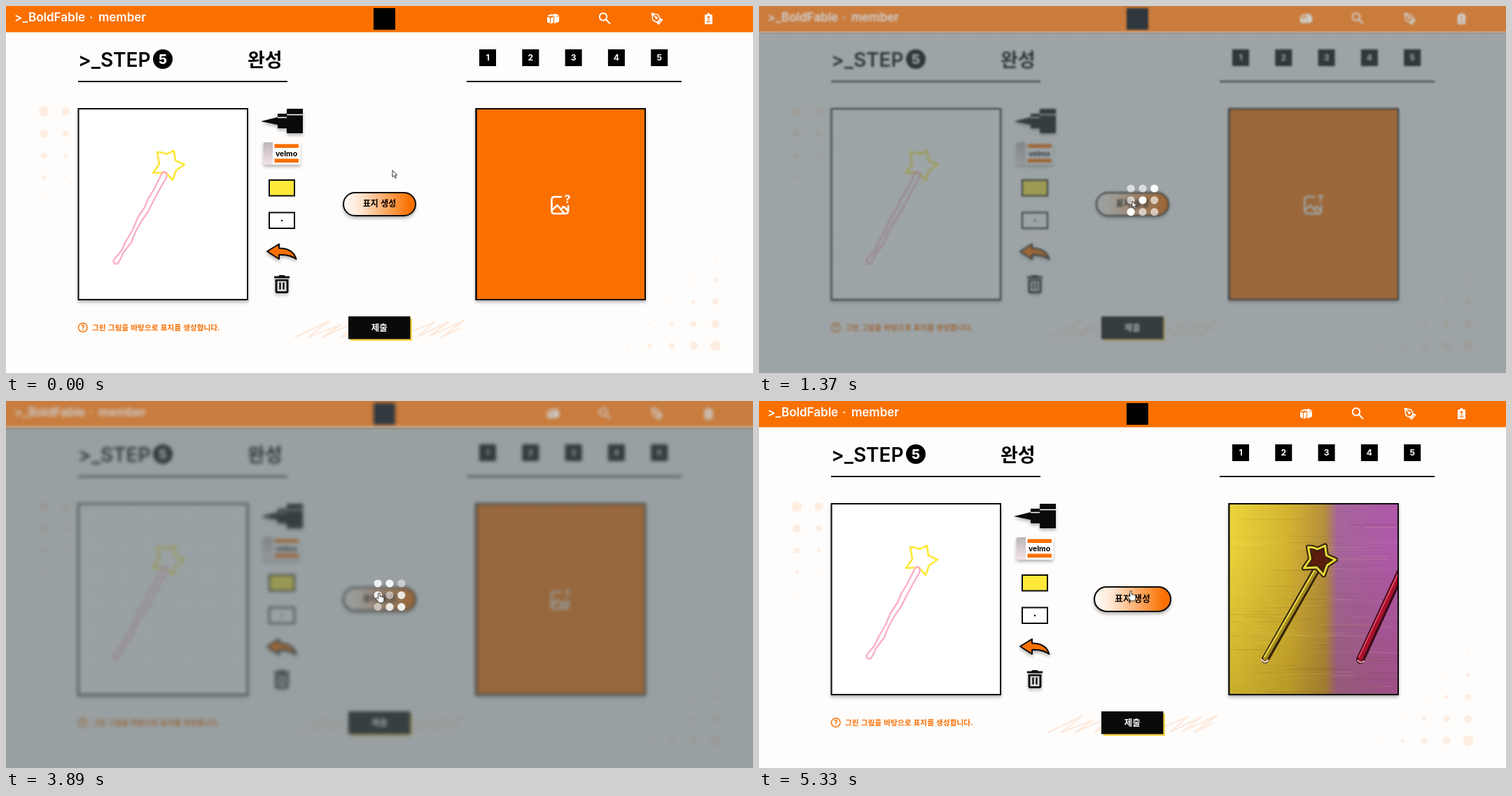
An HTML page that plays this animation: 1067x525 px, repeating every 5360 ms.

```html
<!DOCTYPE html>
<html lang="ko">
<head>
<meta charset="utf-8">
<style>
html, body { margin: 0; width: 100%; height: 100%; overflow: hidden; background: #fefdfc; }
svg, #veil { position: absolute; left: 0; top: 0; width: 1067px; height: 525px; }
svg { font-family: Inter, "Noto Sans CJK KR", "Noto Sans CJK", sans-serif; }
.ko { font-family: "Noto Sans CJK KR", "Noto Sans CJK", sans-serif; font-weight: 700; }
.mid { text-anchor: middle; }
.line { fill: none; stroke-linecap: round; stroke-linejoin: round; }
.box { stroke: #0a0a0a; stroke-width: 2; }
.sh { filter: drop-shadow(0 3px 2px rgba(0, 0, 0, .28)); }
#veil { background: linear-gradient(rgba(125, 143, 157, .4) 38px, rgba(85, 98, 102, .6) 38px); }
</style>
</head>
<body>
<svg viewBox="0 0 1067 525">
  <defs>
    <linearGradient id="btnFill"><stop offset=".04" stop-color="#fff8f2"/><stop offset=".25" stop-color="#ffe3cd"/><stop offset=".92" stop-color="#fa7000"/></linearGradient>
    <linearGradient id="rubber" x2="0" y2="1"><stop stop-color="#b9b5b6"/><stop offset="1" stop-color="#f5e4e8"/></linearGradient>
    <linearGradient id="sky"><stop stop-color="#ead43a"/><stop offset=".35" stop-color="#d3b431"/><stop offset=".57" stop-color="#b48e3c"/><stop offset=".64" stop-color="#a5659a"/><stop offset="1" stop-color="#b057aa"/></linearGradient>
    <linearGradient id="dusk" x2="0" y2="1"><stop offset=".2" stop-color="#5a3200" stop-opacity="0"/><stop offset="1" stop-color="#5a3200" stop-opacity=".22"/></linearGradient>
    <clipPath id="frame"><path d="M672 148h240v272h-240z"/></clipPath>
    <path id="star" d="M216 209Q224 209 229 212L240 207 242 221 255 227 243 235 238 249 228 238 210 239 219 226Z"/>
  </defs>

  <g id="dots" fill="#feeee2"></g>

  <!-- header -->
  <path d="M0 0h1067v37.5H0z" fill="#fa7000"/>
  <g fill="#fff" font-size="17" font-weight="600">
    <text x="12" y="22">&gt;_BoldFable</text><text x="119" y="22">·</text><text x="132" y="22">member</text>
  </g>
  <path d="M525 3h31v31h-31z"/>
  <g fill="#fff">
    <path d="M773 14l6-2.500 3 1-5 2.500zM779.500 13l5-2 5.500 2.500-6 2.500zM773 15.500l4 1.500v8l-4-2zM778 17l4-1.700v8.500l-4 1.700zM783 16.500l7-2v8l-7 2.500z"/>
    <path d="M999.500 12h2.500v-2h3v2h2.500q1.500 0 1.500 1.500v11q0 1.500-1.500 1.500h-8q-1.500 0-1.500-1.500v-11q0-1.500 1.500-1.500z"/>
  </g>
  <g class="line" stroke="#fff" stroke-width="2">
    <circle cx="853" cy="15.500" r="5.200"/><path d="M857 19.500l5.500 5.500"/>
    <path stroke-width="1.600" d="M922.500 10.500l9 2 3 6-4.500 5-6-3zM922.500 10.500l6.500 6.500M930.500 24.500l5.500-6 1.500 1.500-5.500 6z"/>
    <circle cx="929" cy="17" r="1"/>
  </g>
  <g fill="#fa7000"><circle cx="1003.500" cy="16" r="1.800"/><path d="M1000.500 20.500q3-3 6 0zM1000.500 22h6v1.200h-6z"/></g>

  <!-- titles -->
  <text x="103" y="87" font-size="28" font-weight="600">&gt;_STEP</text>
  <circle cx="224" cy="76" r="14"/>
  <text x="224" y="83" class="mid" font-size="19" font-weight="800" fill="#fff">5</text>
  <text x="345" y="86.500" class="ko" font-size="27">완성</text>
  <path d="M103 107h299v2H103zM658 107h307v2H658z" fill="#0a0a0a"/>
  <g id="steps" class="mid" font-size="12" font-weight="700"></g>

  <!-- drawing -->
  <rect class="box sh" x="103.500" y="147" width="241.500" height="273" fill="#fff"/>
  <use href="#star" class="line" stroke="#fee83a" stroke-width="2.700"/>
  <path class="line" stroke="#fbafca" stroke-width="2.400" d="M223 239L212 261 203 276 198 288 188 303 181 320 171 337 165 350 154 363Q152 369 159 369L163 363 167 354 179 338 185 323 194 307 203 294 211 278 219 263 229 246Q231 238 226 237Z"/>

  <!-- tools -->
  <g class="sh">
    <path d="M364 165l24-6v-5h13v-7h23v35h-23v-7h-13v-5z" fill="#0a0a0a"/>
    <path d="M388 159.500h13M401 155.500h23" stroke="#fff" stroke-width="1.600"/>
  </g>
  <g class="sh">
    <rect x="367.500" y="195" width="53" height="32" rx="3" fill="#fff"/>
    <path d="M381 195v32h-10.500q-3 0-3-3v-26q0-3 3-3z" fill="url(#rubber)"/>
    <path d="M383.500 197.500h34.500v5.500h-34.500zM383.500 218.500h34.500v5.500h-34.500z" fill="#fa7000"/>
    <text x="400.500" y="214.500" class="mid" font-size="10.500" font-weight="700">velmo</text>
  </g>
  <rect class="box" x="376" y="249" width="36" height="22.500" fill="#fee83a"/>
  <rect class="box" x="376" y="295.500" width="36" height="22.500" fill="#fff"/>
  <circle cx="394" cy="307" r="1.200"/>
  <path class="sh" d="M373 351l17-10.500v6q20 0 24.500 15.500-10-7-24.500-6v6z" fill="#fa7000" stroke="#0a0a0a" stroke-width="2" stroke-linejoin="round"/>
  <g class="sh"><path d="M383 386.500h6l1.500-1.500h7l1.500 1.500h6v3h-22zM384.500 391h19v17q0 3-3 3h-13q-3 0-3-3zM387.500 393.500v14.500h13v-14.500z" fill="#111" fill-rule="evenodd"/>
    <path d="M391.500 395.500v10M396.500 395.500v10" stroke="#111" stroke-width="2.400"/></g>

  <!-- hint and submit -->
  <g fill="#f96e00">
    <circle cx="109.700" cy="460" r="6.300" fill="none" stroke="#f96e00" stroke-width="1.400"/>
    <text x="109.700" y="463.800" class="mid" font-size="10" font-weight="700">?</text>
    <text x="123" y="464" class="ko" font-size="10.700">그린 그림을 바탕으로 표지를 생성합니다.</text>
  </g>
  <path class="line" stroke="#feeadc" stroke-width="2.200" d="M413 474L461 451 432 474 478 456 452 474 500 452 480 474 530 450 560 474 612 452 588 473 632 452 606 472 654 450 622 474 648 461"/>
  <path d="M492 447h88v32h-88z" fill="#ffd54a"/>
  <path d="M489 444h88.500v32.500H489z" fill="#0a0a0a"/>
  <text x="533.300" y="464.500" class="ko mid" font-size="12.500" fill="#fff">제출</text>

  <!-- cover -->
  <rect class="box sh" x="671.500" y="147" width="241.500" height="273" fill="#fa7000"/>
  <g class="line" stroke="#fff" stroke-width="2.600">
    <path d="M793 273h-9.500q-4 0-4 4v16q0 4 4 4h15.500q4 0 4-4v-7M780 292l7.500-7 10 11.500M792.500 291l4-4 6.500 6"/>
  </g>
  <text x="802" y="281.500" class="mid" font-size="16" font-weight="700" fill="#fff">?</text>
  <g id="cover" clip-path="url(#frame)">
    <path d="M672 148h240v272H672z" fill="url(#sky)"/>
    <path d="M672 148h240v272H672z" fill="url(#dusk)"/>
    <g id="grain"></g>
    <g class="line">
      <path d="M797 240L723 370" stroke="#35240a" stroke-width="11"/>
      <path d="M795 243L723 368" stroke="#a48a1c" stroke-width="6"/>
      <path d="M793 243L722 366" stroke="#e6d548" stroke-width="2"/>
      <path d="M718 370q4 6 9 1" stroke="#f1d3c0" stroke-width="2.500"/>
      <path d="M920 238L859 370" stroke="#3a0a18" stroke-width="12"/>
      <path d="M920 236L859 368" stroke="#a9102c" stroke-width="7"/>
      <path d="M917 238L857 366" stroke="#e2506a" stroke-width="1.600"/>
      <path d="M855 371q4 5 9 1" stroke="#e8b0b8" stroke-width="2"/>
      <use href="#star" x="568.500" fill="#5b1c0c" stroke="#35240a" stroke-width="7"/>
      <use href="#star" x="568.500" stroke="#e8d636" stroke-width="3"/>
    </g>
  </g>
  <rect class="box" x="671.500" y="147" width="241.500" height="273" fill="none"/>

  <g id="button">
    <rect class="box sh" x="482" y="267" width="103" height="33" rx="16.500" fill="url(#btnFill)"/>
    <text x="533.500" y="287" class="ko mid" font-size="12">표지 생성</text>
  </g>
</svg>

<div id="veil"></div>

<svg viewBox="0 0 1067 525">
  <g id="loader" fill="#fff"></g>
  <path id="arrow" d="M0 0v9.500l2.200-2 1.700 3.800 1.700-.8-1.700-3.600h3z" fill="#fff" stroke="#222" stroke-width=".9"/>
  <path id="hand" d="M-1.200 1q0-1.300 1.200-1.300t1.200 1.300v4q1-.8 2 .2 1-.6 2 .4 1.800-.4 1.800 1.400v3q0 3.500-3 4h-3q-1.500 0-2.500-2l-3-4q-.6-1.700 1.300-1.300l2 1.300z" fill="#fff" stroke="#222" stroke-width=".9"/>
</svg>

<script>
const LOOP = 5360, VEIL_ON = 1190, VEIL_OFF = 3980;
const $ = id => document.getElementById(id);
const clamp = x => Math.min(1, Math.max(0, x));
const smooth = x => x * x * (3 - 2 * x);

function add(parent, tag, attrs, text = "") {
  const el = document.createElementNS("http://www.w3.org/2000/svg", tag);
  for (const k in attrs) el.setAttribute(k, attrs[k]);
  el.textContent = text;
  return $(parent).appendChild(el);
}

// halftone corners
for (let row = 0; row < 5; row++) {
  for (let col = 0; col < 5; col++) {
    const r = 1.5 * (row + col - 3);
    if (r > 0) add("dots", "circle", { cx: 888 + 31.3 * col, cy: 360.5 + 31.4 * row, r });
    const q = 7.5 - 1.5 * (row + col);
    if (col < 2 && q > 0) add("dots", "circle", { cx: 54 + 31.2 * col, cy: 151 + 31.4 * row, r: q });
  }
}

for (let i = 0; i < 5; i++) {
  const x = 688 + 61.3 * i;
  add("steps", "rect", { x: x - 12, y: 62, width: 24, height: 24 });
  add("steps", "text", { x, y: 77.5, fill: "#fff" }, i + 1);
}

// woven streaks on the cover
let seed = 7;
const rnd = () => (seed = seed * 16807 % 2147483647) / 2147483647;
for (let i = 0; i < 110; i++) {
  add("grain", "rect", {
    x: 650 + rnd() * 240, y: 148 + rnd() * 272, width: 20 + rnd() * 90, height: 1,
    fill: rnd() < .5 ? "#fff0a0" : "#5a3a20", opacity: .05 + rnd() * .12
  });
}

const cells = [];
for (let i = 0; i < 9; i++) {
  const row = Math.floor(i / 3), col = i % 3;
  cells.push({
    lag: (row + col) / 3,
    el: add("loader", "circle", { cx: 531.2 + 16.8 * col, cy: 261 + 16.8 * row, r: 5.6 })
  });
}

// cursor path: [time, x, y]
const path = [[0, 552, 235], [450, 535, 277], [810, 534, 278], [1370, 533, 279], [2900, 532, 275],
  [3890, 533, 275], [4190, 534, 274], [5330, 531, 272], [LOOP, 531, 272]];

function cursorAt(t) {
  const i = path.findIndex(p => p[0] > t);
  const [t0, x0, y0] = path[i - 1], [t1, x1, y1] = path[i];
  const k = smooth((t - t0) / (t1 - t0));
  return [x0 + (x1 - x0) * k, y0 + (y1 - y0) * k];
}

function pulse(t) {
  const x = t / 1000 % 2;
  return 1 + .1 * smooth(x < 1 ? x : 2 - x);
}

function draw(t) {
  const busy = t >= VEIL_ON && t < VEIL_OFF;
  $("veil").style.display = $("loader").style.display = busy ? "" : "none";
  if (busy) {
    const fade = 1 - (1 - clamp((t - VEIL_ON + 15) / 300)) ** 3;
    const blur = 2.4 * (1 - (1 - clamp((t - VEIL_ON) / 480)) ** 2);
    $("veil").style.backgroundColor = "transparent";
    $("veil").style.backgroundImage = `linear-gradient(rgba(125,143,157,${.4 * fade}) 38px, rgba(85,98,102,${.6 * fade}) 38px)`;
    $("veil").style.backdropFilter = `blur(${blur}px)`;
    for (const { el, lag } of cells)
      el.setAttribute("opacity", .75 + .25 * Math.cos(2 * Math.PI * ((t - 700) / 1000 - lag)));
  }
  $("cover").style.display = t >= VEIL_OFF ? "" : "none";

  const start = t < VEIL_ON ? 210 : 3890;
  const hover = t >= start;
  const s = hover ? pulse(t - start) : 1;
  $("button").setAttribute("transform", `translate(533.5 283.5) scale(${s}) translate(-533.5 -283.5)`);

  const [x, y] = cursorAt(t);
  $("hand").style.display = hover ? "" : "none";
  $("arrow").style.display = hover ? "none" : "";
  for (const id of ["hand", "arrow"]) $(id).setAttribute("transform", `translate(${x} ${y})`);
}

const begin = performance.now();
function tick() {
  draw((performance.now() - begin) % LOOP);
  requestAnimationFrame(tick);
}
tick();
</script>
</body>
</html>
```
